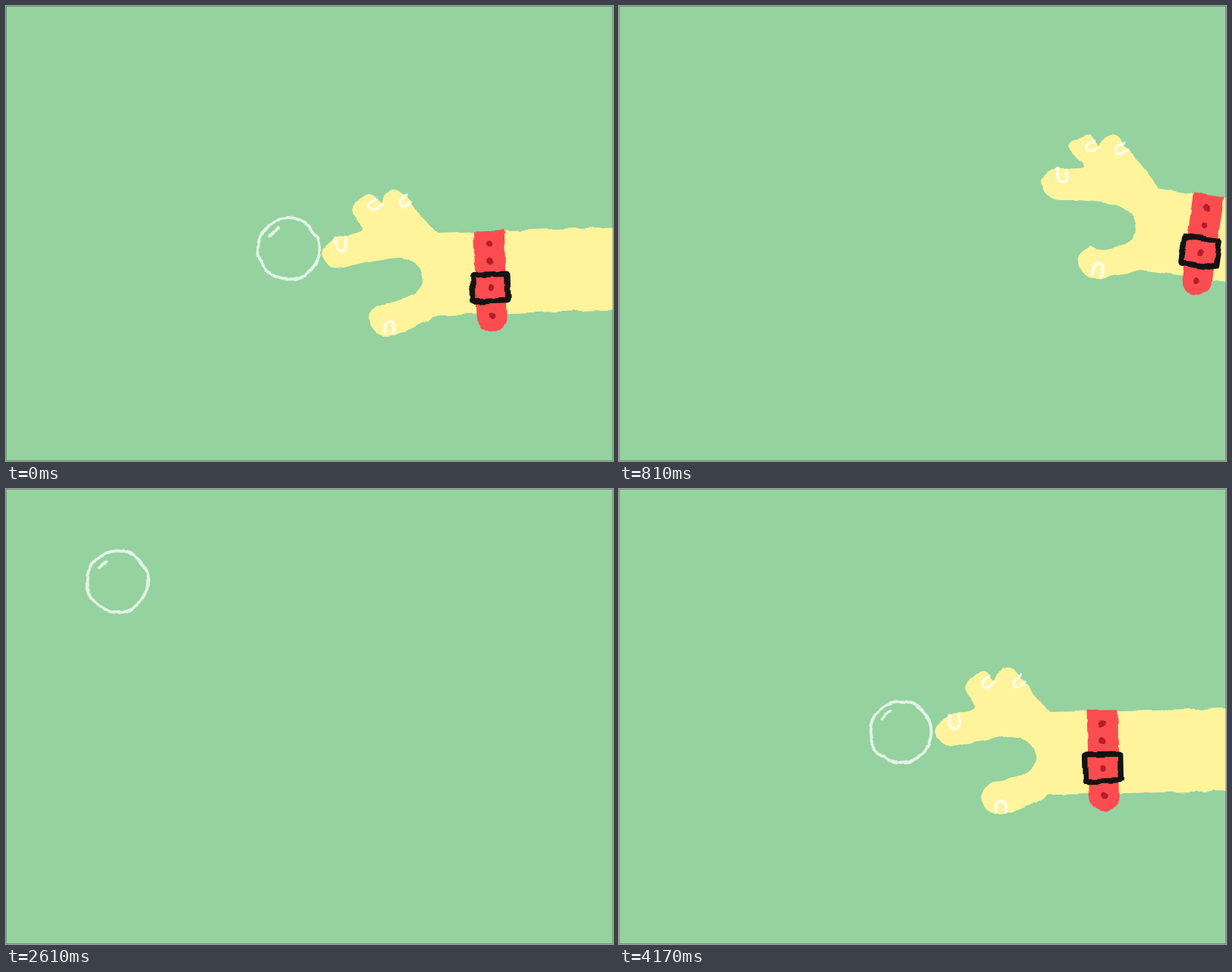
These frames come from a looping animation (800 px wide and 600 px high, 4200 ms). An HTML page:

```html
<!DOCTYPE html>
<html lang="en">
<head>
<meta charset="utf-8">
<title>Bubble</title>
<style>
  html, body { margin: 0; width: 100%; height: 100%; overflow: hidden; background: #95d29f; }
  svg { display: block; width: 100vw; height: 100vh; }
  .line { fill: none; stroke: #fff; stroke-linecap: round; stroke-linejoin: round; }
</style>
</head>
<body>
<svg viewBox="0 0 800 600">
  <defs>
    <filter id="rough" filterUnits="userSpaceOnUse" x="-20" y="-20" width="840" height="640" color-interpolation-filters="sRGB">
      <feTurbulence id="noise" type="fractalNoise" baseFrequency=".045" numOctaves="2" result="n"/>
      <feDisplacementMap in="SourceGraphic" in2="n" scale="6" xChannelSelector="R" yChannelSelector="G"/>
    </filter>
  </defs>
  <rect width="800" height="600" fill="#95d29f"/>
  <g filter="url(#rough)">
    <g id="bubble" class="line" stroke-width="4" opacity=".72">
      <circle r="40.3"/>
      <path d="M-24-17Q-20-23-13.5-27"/>
      <path id="glint" d="M1.5-18L2.5-15.5" stroke-width="5"/>
    </g>
  </g>
  <g filter="url(#rough)">
    <g id="hand">
      <path id="skin" fill="#fff49b"/>
      <g id="nails" class="line" stroke-width="4" opacity=".8"></g>
      <path d="M617.5 284H658.500L657.500 398A19.500 19.500 0 0 1 618.500 398Z" fill="#fb4d50"/>
      <g fill="#b31f29">
        <circle cx="638" cy="301" r="4.300"/><circle cx="637.500" cy="325" r="4.300"/>
        <circle cx="638" cy="360" r="4.300"/><circle cx="638" cy="397" r="4.300"/>
      </g>
      <rect x="614.500" y="342" width="46" height="35.500" rx="1.500" fill="none" stroke="#141313" stroke-width="7.500" stroke-linejoin="round"/>
    </g>
  </g>
  <rect x=".5" y=".5" width="799" height="599" fill="none" stroke="#000" stroke-opacity=".28"/>
</svg>
<script>
const LOOP = 4200, CYCLE_START = 2100;
const $ = id => document.getElementById(id);
const lerp = (a, b, k) => a + (b - a) * k;
const clamp = v => Math.max(0, Math.min(1, v));

// Smooth curve through [time, value] keys that never overshoots a key.
function track(...keys) {
  const slopes = keys.slice(1).map((k, i) => (k[1] - keys[i][1]) / (k[0] - keys[i][0]));
  const tangent = i => {
    const a = slopes[i - 1], b = slopes[i];
    if (a === undefined || b === undefined) return a ?? b;
    return a * b <= 0 ? 0 : 2 * a * b / (a + b);
  };
  return t => {
    if (t <= keys[0][0]) return keys[0][1];
    const i = keys.findIndex(k => k[0] > t) - 1;
    if (i < 0) return keys[keys.length - 1][1];
    const [t0, v0] = keys[i], [t1, v1] = keys[i + 1];
    const d = t1 - t0, u = (t - t0) / d, w = 1 - u;
    return v0 * w * w * (1 + 2 * u) + v1 * u * u * (3 - 2 * u)
      + d * u * w * (tangent(i) * w - tangent(i + 1) * u);
  };
}

const motion = {
  bubbleX: track([2100, -8], [2610, 146.5], [3150, 263.7], [3510, 320], [4170, 371.2], [4200, 372.3], [4710, 383.5], [4800, 384]),
  bubbleY: track([2100, -42], [2610, 121.5], [3150, 268.7], [3510, 306], [4170, 320.2], [4800, 320.5]),
  dx: track([2700, 420], [3150, 130], [3510, 0], [4450, 0], [4710, -19], [4790, -22], [5250, 405]),
  dy: track([3150, -11], [3510, 0], [4200, 0], [4710, 15.5]),
  angle: track([2700, -6], [3150, -3.6], [3510, 0], [3700, .5], [4170, -1.2], [4200, -1.85], [4450, -7], [4710, .5], [4860, 9], [5250, 5]),
  open: track([3150, 0], [3510, 1]),
  bend: track([3510, 0], [3700, 2], [4170, 10], [4200, 10.7], [4450, 12], [4710, 0]),
  spread: track([4450, 0], [4710, 1])
};

// Outline from wrist top to wrist bottom: [part, open x, open y, curled x, curled y].
const upper = [
  ["wrist", 571, 285, 558, 284], ["wrist", 550, 263, 550, 279],
  ["fingers", 532, 238, 543, 277], ["fingers", 515, 226, 532, 274], ["fingers", 501, 234, 522, 273],
  ["fingers", 497, 242, 512, 274], ["fingers", 490, 234, 502, 276], ["fingers", 478, 231, 492, 279],
  ["fingers", 458, 250, 477, 286]
];
const lower = [
  ["index", 470, 270, 462, 295], ["index", 434, 278, 441, 312], ["index", 417, 298, 433, 330],
  ["index", 436, 317, 451, 352], ["index", 475, 314, 475, 340], ["index", 520, 314, 500, 326],
  ["wrist", 542, 327, 535, 326], ["wrist", 549, 347, 553, 347], ["wrist", 538, 363, 540, 356],
  ["wrist", 510, 374, 513, 357], ["thumb", 487, 379, 492, 356], ["thumb", 475, 397, 475, 376],
  ["thumb", 492, 419, 495, 400], ["thumb", 525, 413, 525, 400], ["wrist", 566, 394, 561, 392]
];
const outline = upper.concat(lower);

const nails = [
  { at: ["index", 443, 285, 449, 318], turn: [-4, -52], size: [1, 1] },
  { at: ["fingers", 489, 245, 495, 285], turn: [48, 0], size: [.9, 0] },
  { at: ["fingers", 528, 243, 540, 280], turn: [58, 0], size: [.9, 0] },
  { at: ["thumb", 503, 408, 500, 391], turn: [190, 188], size: [1, 1] }
];
for (const nail of nails) {
  nail.el = document.createElementNS("http://www.w3.org/2000/svg", "path");
  nail.el.setAttribute("d", "M-6-8V2A6 6 0 0 0 6 2V-8");
  $("nails").append(nail.el);
}

function place([part, ox, oy, cx, cy], pose) {
  let x = lerp(cx, ox, pose.open), y = lerp(cy, oy, pose.open);
  if (part === "index") y += pose.bend * clamp((540 - x) / 95);
  if (part === "fingers") { x -= 12 * pose.spread; y -= 3 * pose.spread; }
  if (part === "thumb") { x += 4 * pose.spread; y -= 6 * pose.spread; }
  return [x, y];
}

function spline(points) {
  const at = i => points[Math.max(0, Math.min(points.length - 1, i))];
  const handle = (i, side) => at(i).map((v, a) => v + side * (at(i + 1)[a] - at(i - 1)[a]) / 6);
  return points.slice(1).map((p, i) => `C${[...handle(i, 1), ...handle(i + 1, -1), ...p]}`).join("");
}

function draw(now) {
  const t = now % LOOP, time = t < CYCLE_START ? t + LOOP : t;
  const pose = {};
  for (const name in motion) pose[name] = motion[name](time);

  $("noise").setAttribute("seed", 1 + Math.floor(t / 120));
  $("bubble").setAttribute("transform", `translate(${pose.bubbleX} ${pose.bubbleY})`);
  $("bubble").style.display = time < 4770 ? "" : "none";
  $("glint").style.display = time >= 4680 ? "" : "none";

  $("hand").setAttribute("transform", `translate(${pose.dx} ${pose.dy}) rotate(${pose.angle} 1000 340)`);
  const points = outline.map(p => place(p, pose));
  $("skin").setAttribute("d", `M1600 285L${points[0]}${spline(points)}L1600 394Z`);
  for (const { el, at, turn, size } of nails) {
    const angle = lerp(turn[1], turn[0], pose.open), scale = lerp(size[1], size[0], pose.open);
    el.setAttribute("transform", `translate(${place(at, pose)}) rotate(${angle}) scale(${scale})`);
    el.style.display = scale > .05 ? "" : "none";
  }
}

const start = performance.now();
function tick() {
  draw(performance.now() - start);
  requestAnimationFrame(tick);
}
tick();
</script>
</body>
</html>
```
